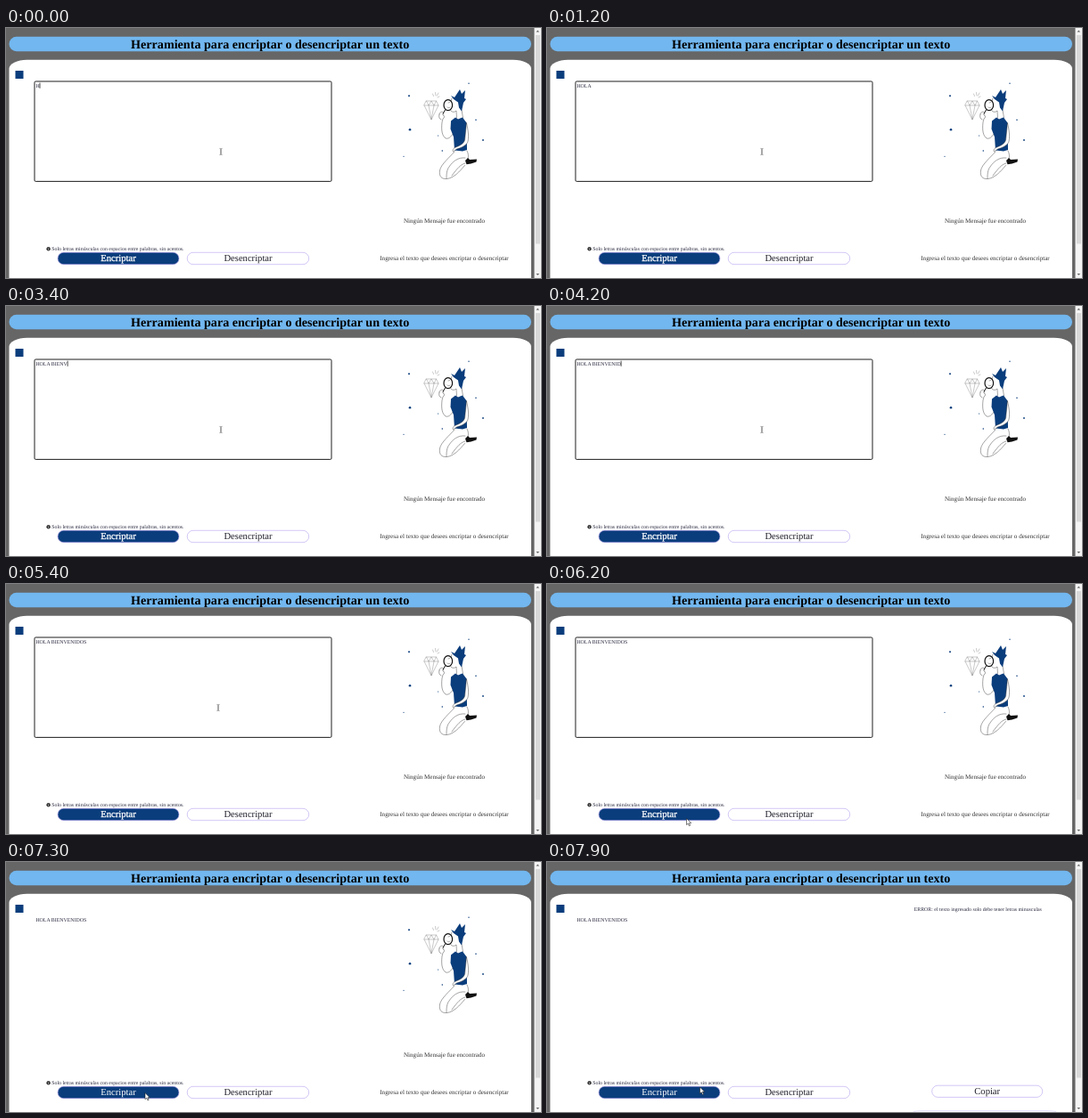
These frames come from a looping animation (600x281 px, 8 s). An HTML page:

```html
<!DOCTYPE html>
<html lang="es">
<head>
<meta charset="utf-8">
<style>
  html, body { margin: 0; width: 100%; height: 100%; overflow: hidden; background: #666; }
  svg { display: block; width: 600px; height: 281px; }
  text { font-family: "Liberation Serif", "Times New Roman", serif; font-size: 7.08px; fill: #333; text-rendering: geometricPrecision; white-space: pre; }
  .mid { text-anchor: middle; }
  .title { font-size: 14.12px; font-weight: bold; fill: #000; }
  .small { font-size: 5.86px; fill: #2a2a40; }
  .label { font-size: 10.6px; fill: #1c1c28; }
  .button { fill: #fff; stroke: #b5a2ee; stroke-width: .6; }
  .navy { fill: #0a3d7c; }
  .line { fill: none; stroke: #333; stroke-width: .45; stroke-linejoin: round; stroke-linecap: round; }
  .faint { stroke: #777; stroke-width: .4; }
</style>
</head>
<body>
<svg viewBox="0 0 600 281">
  <rect width="600" height="281" fill="#666"/>
  <rect x="3.5" y="9.8" width="585.5" height="16.4" rx="8.2" fill="#72b7ef"/>
  <text class="mid title" x="296.2" y="22.6">Herramienta para encriptar o desencriptar un texto</text>
  <rect x="3.5" y="35.7" width="585.5" height="270" rx="20" ry="10" fill="#fff"/>
  <rect class="navy" x="10.5" y="48" width="9" height="9"/>

  <!-- Scrollbar -->
  <rect x="592.5" width="7.5" height="281" fill="#f4f4f4"/>
  <rect x="594" y="8" width="5" height="234.5" fill="#d8d8d8"/>
  <path d="M594.5 4.6l1.8-2 1.8 2zM594.5 276l1.8 2 1.8-2z" fill="#666"/>

  <rect id="focus" x="32" y="60" width="333" height="112.4" rx="1.3" fill="none" stroke="#111" stroke-width=".95"/>
  <text id="typed" class="small" x="33.4" y="66.6"></text>
  <rect id="caret" y="61.6" width=".7" height="6.2"/>

  <circle cx="47.6" cy="248.2" r="2.2" fill="#333"/>
  <path d="M47.6 247.9v1.5M47.6 246.7v.5" stroke="#fff" stroke-width=".6"/>
  <text class="small" x="51.2" y="250.3">Solo letras minúsculas con espacios entre palabras, sin acentos.</text>

  <rect class="button" x="58" y="252.3" width="136" height="13.4" rx="6.7" style="fill:#0a3d7c"/>
  <text id="encrypt" class="mid label" x="126" y="262.4" style="fill:#fff" stroke="#fff">Encriptar</text>
  <rect class="button" x="203.2" y="252.3" width="136.5" height="13.4" rx="6.7"/>
  <text class="mid label" x="271.5" y="262.4">Desencriptar</text>

  <g id="empty">
    <g class="navy">
      <circle cx="452" cy="76.2" r="1"/><circle cx="519" cy="62.2" r=".7"/>
      <circle cx="453" cy="114.3" r="1.3"/><circle cx="535" cy="126" r=".9"/>
      <circle cx="489.3" cy="138" r=".8"/><circle cx="446" cy="144.3" r=".6"/>
      <circle cx="484.6" cy="121" r=".6"/><circle cx="527" cy="103.3" r=".8"/>
    </g>
    <!-- Diamond -->
    <g class="line faint">
      <path d="M471.5 82h11l2.5 5-8 16-8-16zM469 87h16M471.500 82l2.500 5 3-5 3 5 2.500-5M474 87l3 16 3-16"/>
      <path d="M478.500 74l1 2.500M481.500 72.500l.5 3.500M485 73l-1.500 3M484 78l2-1"/>
    </g>
    <!-- Kneeling figure -->
    <path class="line" d="M500 79c-1 4-2 8-2 12 1 4 5 4 7 2l.5 8M511 92l1.500 9"/>
    <path class="navy" d="M499 76l4 2 6-9 2 5 4-4-1 9 2 1-3 4-2 9.500-3-4-1-6-5-3.500z"/>
    <path class="navy" d="M499 104.500l5-4 3 2 5-2 4.500 6 .5 30.500-5 1.500-9-1-1-15-3.500-9z"/>
    <path class="line" d="M486 97c0-2 3-4 4.500-2l-.5 3c2 0 2 3 0 4l-1 4c-1 9 0 15 4 18 4 1 6-2 8-5M486 97c-1 3 0 5 2 6"/>
    <path class="line" d="M516.500 107c2 8 3 17 1 22-3 4-8 6-12 7l-4 3c-1-2 0-4 3-5 5-2 9-4 10-8z" style="fill:#fff"/>
    <path class="line" d="M503 139c-6 7-15 14-16.500 21-1 7 2 10 8 9.500 8-1 14-8 20-15M517 138c2 4 2 8 0 11M515 146c-8-1-14 4-18 10-3 4-3 9-3 13M515 152c-5 1-9 6-15 14"/>
    <path d="M515 149l3-3 2 2 8-.5-.5 3-6 2-5 .8z" fill="#111"/>
    <path d="M492.500 92l-2.500 4.500" stroke="#111"/>
    <ellipse cx="495.800" cy="86.700" rx="4.800" ry="6" fill="#fff" stroke="#111" stroke-width="1.200"/>
    <path class="line" d="M496 84l1.500-.5M495 89c1 1 2 1 3 0"/>
    <text class="mid" x="491.500" y="218.800">Ningún Mensaje fue encontrado</text>
    <text class="mid" x="491.500" y="261">Ingresa el texto que desees encriptar o desencriptar</text>
  </g>

  <g id="error">
    <text class="small" x="411.700" y="54.600">ERROR: el texto ingresado solo debe tener letras minusculas</text>
    <rect class="button" x="431.700" y="251.200" width="124" height="13.200" rx="6.600"/>
    <text class="mid label" x="493.700" y="261.200">Copiar</text>
    <path d="M411 280.500q4-.9 12-.9h136q8 0 12 .9" fill="none" stroke="#d3c9f5" stroke-width=".6"/>
  </g>

  <path id="beam" d="M-1.500-3.600q1.500 0 1.500 1v5.200q0 1-1.500 1M1.500-3.600q-1.500 0-1.500 1v5.200q0 1 1.500 1" fill="none" stroke="#555" stroke-width=".6"/>
  <path id="arrow" d="M0 0v7.200l1.700-1.500 1.200 2.700 1.200-.5-1.200-2.600h2.300z" fill="#fff" stroke="#111" stroke-width=".55"/>
</svg>
<script>
const LOOP = 8000, STEP = 100, BLINK = 500, CLICK = 7300, RESULT = 7400;
const message = "HOLA BIENVENIDOS";
// Moment each letter is typed, in ms
const keyTimes = [0, 100, 400, 700, 1600, 2800, 3000, 3000, 3100, 3400, 3600, 3900, 4200, 4200, 4400, 4600];
// Pointer path: time, x, y
const pointer = [
  [5100, 241, 139], [5400, 238, 139], [5600, 222, 162], [6000, 160, 258],
  [6200, 156.5, 263.5], [6400, 156.5, 263.5], [6800, 156, 259.5],
  [7400, 156, 259.5], [7900, 171.5, 253]
];
const el = Object.fromEntries([...document.querySelectorAll("[id]")].map(node => [node.id, node]));
const show = (node, visible) => node.setAttribute("visibility", visible ? "visible" : "hidden");

function pointerAt(t) {
  const next = pointer.findIndex(p => p[0] > t);
  if (next === 0) return pointer[0].slice(1);
  if (next < 0) return pointer.at(-1).slice(1);
  const [t0, x0, y0] = pointer[next - 1], [t1, x1, y1] = pointer[next];
  const k = (t - t0) / (t1 - t0);
  return [x0 + (x1 - x0) * k, y0 + (y1 - y0) * k];
}

function draw(now) {
  const t = Math.floor((now % LOOP) / STEP) * STEP;
  const count = keyTimes.filter(k => k <= t).length;
  const focused = t < CLICK;

  el.typed.textContent = message.slice(0, count);
  el.caret.setAttribute("x", 33.4 + el.typed.getComputedTextLength());
  show(el.caret, focused && (t - keyTimes[count - 1]) % (2 * BLINK) < BLINK);
  show(el.focus, focused);
  el.encrypt.setAttribute("stroke-width", focused ? .3 : 0);
  show(el.empty, t < RESULT);
  show(el.error, t >= RESULT);

  const [x, y] = pointerAt(t);
  const overField = y < 172;
  for (const node of [el.beam, el.arrow]) node.setAttribute("transform", `translate(${x} ${y})`);
  show(el.beam, overField);
  show(el.arrow, !overField);
}

function frame() {
  draw(performance.now());
  requestAnimationFrame(frame);
}
frame();
</script>
</body>
</html>
```
